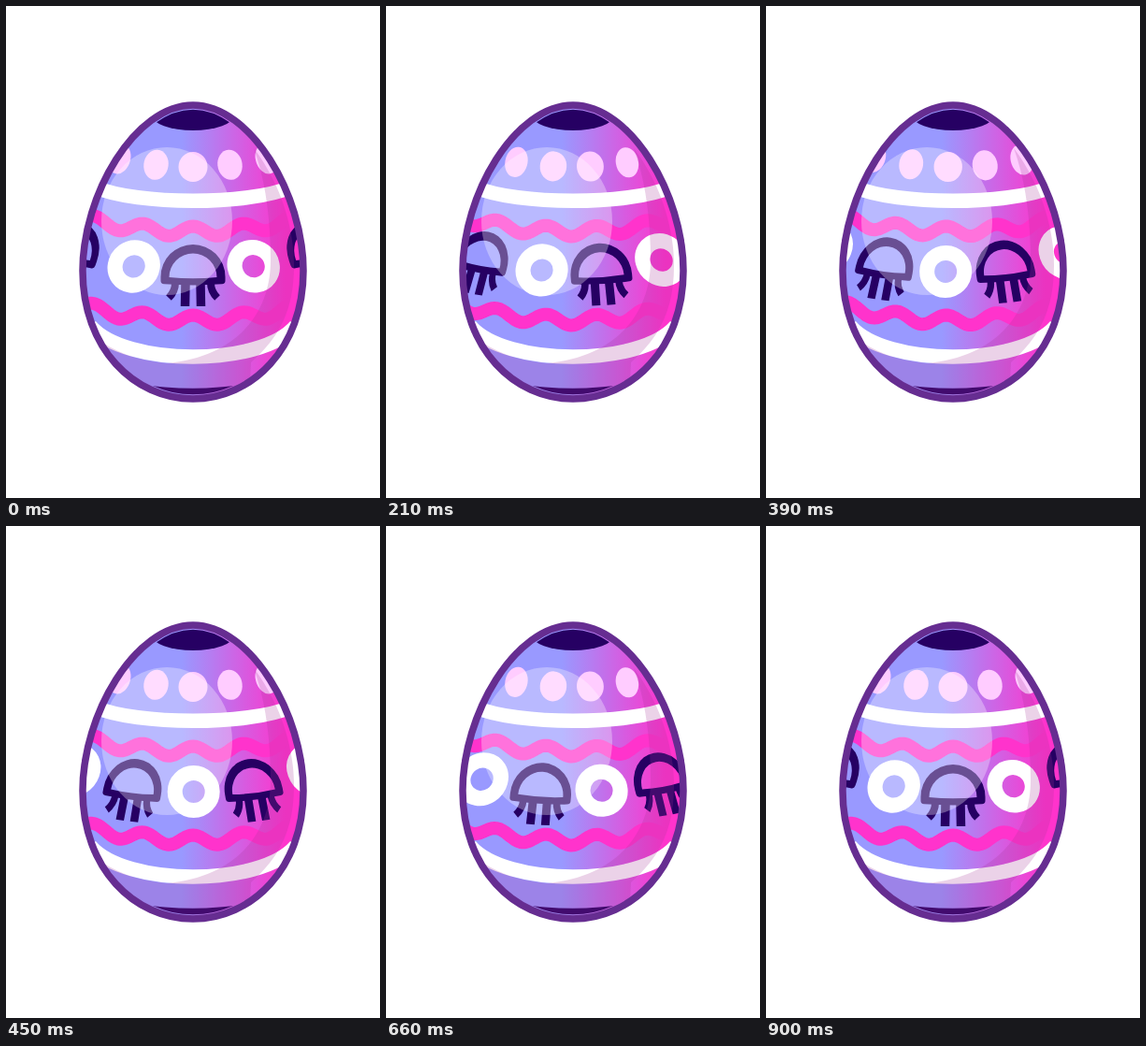
Write an HTML page that moves like this. It is 400 px wide and 526 px high and loops after 930 ms.

```html
<!DOCTYPE html>
<html lang="en">
<head>
<meta charset="utf-8">
<title>Spinning egg</title>
<style>
  html, body { margin: 0; width: 100%; height: 100%; overflow: hidden; background: #fff; }
  svg { display: block; width: 100%; height: 100%; }
</style>
</head>
<body>
<svg viewBox="0 0 400 526">
  <defs>
    <path id="egg" d="M200 106C262 106 318 202 318 283C318 366 263 420 200 420C137 420 82 366 82 283C82 202 138 106 200 106Z"/>
    <clipPath id="inside"><use href="#egg"/></clipPath>
    <linearGradient id="skin" gradientUnits="userSpaceOnUse" x1="188" y1="0" x2="299" y2="0">
      <stop offset="0" stop-color="#99f"/>
      <stop offset="1" stop-color="#f3c"/>
    </linearGradient>
    <ellipse id="ring" rx="20" ry="20" fill="none" stroke="#fff" stroke-width="16"/>
    <g id="eye" fill="none" stroke="#260063">
      <path d="M-34.5 5.5A34.5 34.5 0 0 1 34.5 5.5V10Q34.5 13 31 13.3Q0 15.5 -31 13.3Q-34.5 13 -34.5 10ZM-25.5 6A25.5 25.5 0 0 1 25.5 6Q0 8.5 -25.5 6Z" fill="#260063" fill-rule="evenodd" stroke="none"/>
      <path d="M-8 12L-8.5 37M8 12L8.5 37" stroke-width="9.5"/>
      <path d="M-19 12Q-19 21 -26 28M19 12Q19 21 26 28" stroke-width="8"/>
    </g>
    <ellipse id="dot" rx="15.5" ry="16" fill="#fcf"/>
  </defs>
  <g clip-path="url(#inside)">
    <use href="#egg" fill="url(#skin)"/>
    <g fill="#260063">
      <ellipse cx="200" cy="117" rx="44" ry="16"/>
      <path d="M140 404Q200 413.5 260 404V425H140Z"/>
    </g>
    <use href="#egg" fill="none" stroke="url(#skin)" stroke-width="9.5"/>
    <g fill="none" stroke="#fff" stroke-width="15.5">
      <path d="M96 194C140 213 260 213 304 194"/>
      <path d="M90 342C127 386 273 386 310 342"/>
    </g>
    <g fill="none" stroke="#f3c" stroke-width="14" stroke-linejoin="round">
      <path id="upper"/>
      <path id="lower"/>
    </g>
    <g id="marks"></g>
    <path d="M265 152C277 185 283 225 283 272C283 330 245 375 172 382C140 379 115 370 94 353L110 425H260L262 381C292 355 308 325 308 278C308 230 290 185 265 152Z" fill="#a33296" fill-opacity=".22"/>
    <ellipse cx="172" cy="230" rx="70" ry="79" fill="#fff" fill-opacity=".31"/>
  </g>
  <use href="#egg" fill="none" stroke="#662d91" stroke-width="7.5"/>
</svg>
<script>
  const LOOP = 930, STEP = 30, TURN = 30;
  const MID = 200, BEND = 0.0014;
  const byId = id => document.getElementById(id);

  // Each row of marks slides along an arc; squash narrows a mark away from the middle.
  const rows = [
    { shape: 'dot', y: 172, gap: 39.5, shift: 79, start: 0, count: 7,
      squash: x => Math.max(0.77, 1 - 0.0039 * Math.abs(x)) },
    { shape: 'eye', y: 284, gap: 128, shift: 128, start: 0, count: 5,
      squash: x => 1 - 0.0017 * Math.abs(x) },
    { shape: 'ring', y: 284, gap: 128, shift: 128, start: 64.7, count: 5,
      squash: x => 1 - 0.0000025 * x * x }
  ];

  for (const row of rows) {
    row.items = Array.from({ length: row.count }, () => {
      const use = document.createElementNS('http://www.w3.org/2000/svg', 'use');
      use.setAttribute('href', '#' + row.shape);
      return byId('marks').appendChild(use);
    });
  }

  function placeRow(row, phase) {
    const offset = (row.start + row.shift * phase) % row.gap;
    row.items.forEach((item, i) => {
      const x = offset + (i - (row.count >> 1)) * row.gap;
      const lean = 2 * BEND * x, wide = row.squash(x);
      const matrix = [wide, -0.7 * lean * wide, lean, 1, MID + x, row.y - BEND * x * x];
      item.setAttribute('transform', `matrix(${matrix})`);
    });
  }

  function wave(y, bend, phase) {
    const gap = 53, points = [];
    for (let x = -124; x <= 124; x += 2) {
      const swing = 5.5 * Math.cos(2 * Math.PI * (x / gap - 2 * phase));
      points.push(`${MID + x} ${(y - bend * x * x - swing).toFixed(2)}`);
    }
    return 'M' + points.join('L');
  }

  function draw(now) {
    const phase = Math.floor((now % LOOP) / STEP) / TURN;
    rows.forEach(row => placeRow(row, phase));
    byId('upper').setAttribute('d', wave(241, 0.001, phase));
    byId('lower').setAttribute('d', wave(336, 0.0011, phase));
  }

  function tick() {
    draw(performance.now());
    requestAnimationFrame(tick);
  }
  tick();
</script>
</body>
</html>
```
